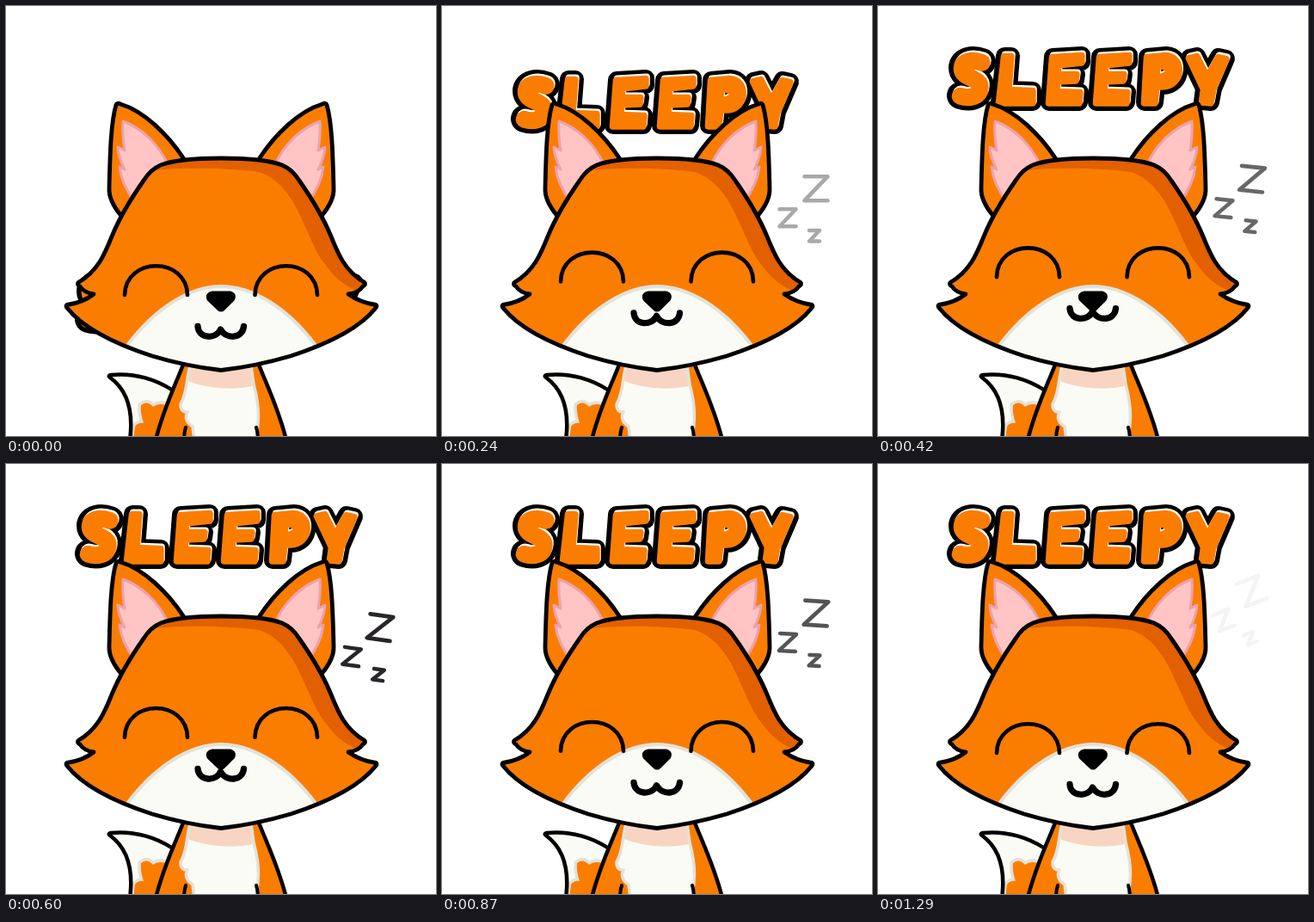
Write an HTML page with a canvas that moves like this. It is 500 by 500 pixels and loops after 1.32 s.

```html
<!DOCTYPE html>
<html lang="en">
<head>
<meta charset="utf-8">
<title>Sleepy fox</title>
<style>
  html, body { margin: 0; width: 100%; height: 100%; overflow: hidden; background: #fff; }
  canvas { display: block; width: 500px; height: 500px; }
</style>
</head>
<body>
<canvas id="stage" width="500" height="500" aria-label="Sleepy"></canvas>
<script>
const ctx = document.getElementById('stage').getContext('2d');
const LOOP = 1320, STEP = 30;
const ORANGE = '#fb7d00', SHADE = '#e26000', CREAM = '#fbfbf6', EDGE = '#e3e2da';
const PINK = '#ffc4c3', PINK_EDGE = '#eba2ae', BLACK = '#000';

const shape = d => new Path2D(d);

// The S is a thick line; the other letters are filled blocks.
const letterS = shape('M121 65C110 61 98 63 98 72C98 84 120 82 119 94C118 106 105 107 96 104');
const letterE = shape('M203 59L237 57L237 65L210 68L209 79L231 79L230 86L209 87L208 99L235 100L234 112L199 112Z');
const blocks = shape(
  'M147 58L155 58L152 97L180 98L180 112L141 112Z' +
  'M313 59L335 57C357 58 355 93 331 93L324 93L322 112L310 112ZM325 68L324 82C341 82 343 69 325 68Z' +
  'M362 60L371 58L383 82L396 59L405 61L390 96L387 112L377 111L379 96Z');
blocks.addPath(letterE);
blocks.addPath(letterE, { e: 55 });

const ear = shape('M134 244C124 232 119.5 222 120 212C121 170 122 135 128 115Q129 112 133 114C160 122 188 149 207 178L175 225Z');
const innerEar = shape('M136 134C158 142 177 160 188 184L150 228C143 219 134 205 132 187L138 190Q131 177 130 164L138 168Q135 150 136 134Z');
const head = shape(
  'M250 177C225 177 198 178 180 185Q168 190 160 203C146 223 132 246 123 268' +
  'C115 288 107 308 84 321.5Q82 324 86 326C90 332 95 334 102 335C93 342 82 346 71 347.5Q69 348.5 71 351' +
  'C90 375 130 394 170 407Q210 419 250 423.5Q290 419 331 407C371 394 411 375 430 351Q432 348.5 430 347.5' +
  'C419 346 408 342 398 335C406 334 411 332 415 326Q419 324 417 321.5C394 308 386 288 378 268' +
  'C369 246 355 223 341 203Q333 190 321 185C303 178 276 177 250 177Z');
const headShade = shape('M172 191C215 187 265 189 294 193C319 201 334 225 344 248C355 272 362 290 370 299C380 313 391 324 407 331L440 320L380 180L250 165Z');
const muzzle = shape('M140 396C174 350 215 326 250 326C286 326 327 350 361 396L250 440Z');
const eyes = shape('M138 336C139 291 210 291 211 336M289.5 336C290.5 291 361 291 362 336');
const nose = shape('M240 333.5H260Q267 335 264 341L253 352Q250 355 247 352L235.5 341Q233 335 240 333.5Z');
const mouth = shape('M223 372.5C224 387 244 388 249.5 376C256 388 275 387 276.5 372.5');

const tail = shape('M144 505C148 475 143 448 121 432Q118 430 122 429C150 426 176 435 194 447L200 505Z');
const tailPatch = shape('M148 505L150 489Q154 484 160 485Q156 473 157 464Q164 458 171 466Q177 461 186 464L190 505Z');
const body = shape('M208 412C197 441 183 468 174 505H326C317 468 303 441 292 412Z');
const chest = shape('M216 412C209 430 212 448 203 463Q203 473 211 472Q206 482 217 489L219 505H289C296 485 294 462 288 440Q286 425 284 412Z');
const chinShade = shape('M205 405H295V440Q250 452 206 434Z');
const legs = shape('M207 505Q207 496 209 490M293 505Q293 496 291 490');

const zees = [
  { x: 435, y: 227, w: 27, h: 28, line: 4.7 },
  { x: 402, y: 261, w: 19, h: 20, line: 4.5 },
  { x: 433, y: 282, w: 12, h: 12.5, line: 4.5 }
];

const clamp = v => Math.max(0, Math.min(1, v));
const smooth = v => v * v * (3 - 2 * v);

function fill(path, color) {
  ctx.fillStyle = color;
  ctx.fill(path);
}

function stroke(path, color, width) {
  ctx.strokeStyle = color;
  ctx.lineWidth = width;
  ctx.stroke(path);
}

function group(draw) {
  ctx.save();
  draw();
  ctx.restore();
}

function inkWord(color, grow, dx, dy) {
  group(() => {
    ctx.translate(dx, dy);
    stroke(letterS, color, 20 + grow);
    fill(blocks, color);
    stroke(blocks, color, 8 + grow);
  });
}

function drawWord(offset) {
  inkWord(BLACK, 12, 0, offset);
  inkWord('#fff', 0, 0.8, offset - 1.5);
  inkWord(ORANGE, 0, -0.3, offset + 0.8);
}

function drawBody() {
  fill(tail, CREAM);
  group(() => {
    ctx.clip(tail);
    stroke(tailPatch, EDGE, 7);
    fill(tailPatch, ORANGE);
  });
  stroke(tail, BLACK, 4.5);

  fill(body, ORANGE);
  group(() => {
    ctx.clip(body);
    fill(chest, CREAM);
    group(() => {
      ctx.clip(chest);
      fill(chinShade, '#f8d5c2');
    });
    stroke(chest, EDGE, 3.5);
  });
  stroke(body, BLACK, 4.5);
  stroke(legs, BLACK, 4);
}

function drawEar() {
  fill(ear, ORANGE);
  fill(innerEar, PINK);
  stroke(innerEar, PINK_EDGE, 3);
  stroke(ear, BLACK, 4.8);
}

function drawHead(lift) {
  drawEar();
  group(() => {
    ctx.translate(501, 0);
    ctx.scale(-1, 1);
    drawEar();
  });

  fill(head, ORANGE);
  group(() => {
    ctx.clip(head);
    fill(headShade, SHADE);
    fill(muzzle, CREAM);
    stroke(muzzle, EDGE, 4);
  });
  stroke(head, BLACK, 4.8);

  fill(nose, BLACK);
  stroke(nose, BLACK, 4);
  group(() => {
    ctx.translate(0, -lift);
    stroke(eyes, BLACK, 4.6);
    stroke(mouth, BLACK, 7.3);
  });
}

function drawZees(t) {
  const angle = 8 - 6.2e-5 * (t - 600) ** 2;
  group(() => {
    ctx.globalAlpha = Math.min(clamp(t / 600), clamp((LOOP - t) / 570));
    for (const { x, y, w, h, line } of zees) {
      group(() => {
        ctx.translate(x, y - t * 0.0615);
        ctx.rotate(angle * Math.PI / 180);
        stroke(shape(`M${-w / 2} ${-h / 2}h${w}l${-w} ${h}h${w}`), '#28262a', line);
      });
    }
  });
}

function render(t) {
  ctx.fillStyle = '#fff';
  ctx.fillRect(0, 0, 500, 500);
  ctx.lineCap = ctx.lineJoin = 'round';
  drawWord(260 * (1 - smooth(clamp(t / 300))));
  drawBody();
  drawHead(21 * Math.sin(Math.PI * clamp(t / 900)));
  drawZees(t);
}

const start = performance.now();
function tick() {
  const t = (performance.now() - start) % LOOP;
  render(Math.floor(t / STEP) * STEP);
  requestAnimationFrame(tick);
}
tick();
</script>
</body>
</html>
```
